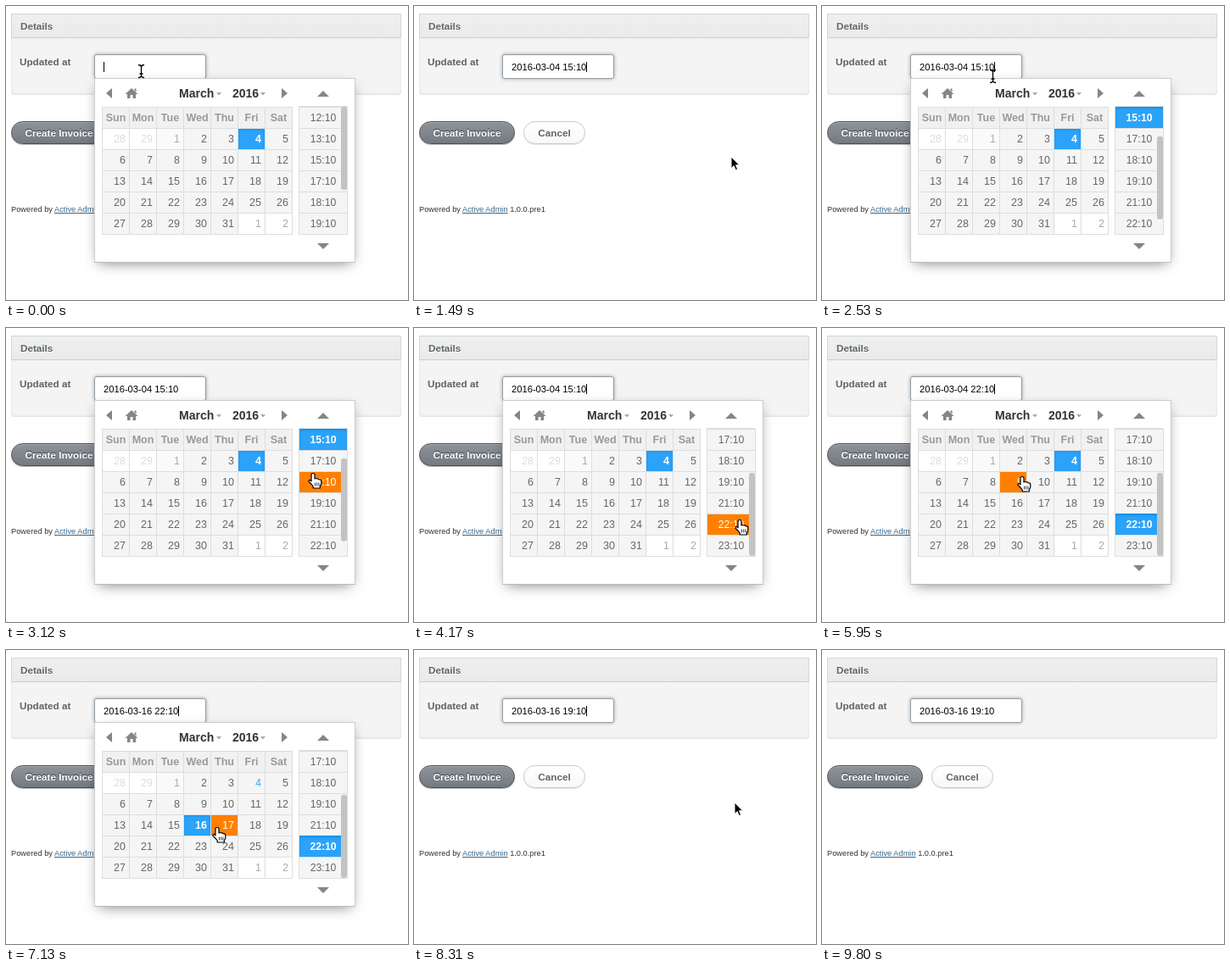
These frames come from a looping animation (474x347 px, 9900 ms). An HTML page:

```html
<!DOCTYPE html>
<html lang="en">
<head>
<meta charset="utf-8">
<title>Date and time picker</title>
<style>
  html, body { margin: 0; width: 100%; height: 100%; overflow: hidden; background: #fff; }
  body { position: relative; font: 11.7px/1 "Liberation Sans", Arial, sans-serif; color: #5e6469; }
  div, span, svg { position: absolute; box-sizing: border-box; white-space: pre; }
  svg { overflow: visible; }

  #head { left: 6px; top: 9px; width: 460px; height: 29px; padding-left: 10px; line-height: 28px;
    border: 1px solid #d3d5d7; border-bottom-color: #cbced0; font-weight: bold;
    background: linear-gradient(#efefef, #e9eaea); text-shadow: 0 1px #fff; }
  #panel { left: 6px; top: 38px; width: 460px; height: 67px; border-radius: 0 0 4px 4px;
    background: #f4f4f4; box-shadow: inset 0 -1px 3px #ddd; }
  #label { left: 16px; top: 58px; line-height: 16px; font-weight: bold; }
  #field { left: 104px; top: 57px; width: 132px; height: 29px; border: 1px solid #959da5;
    border-radius: 3px; background: #fff; box-shadow: 0 0 4px #99a2aa; }
  #text { left: 10px; top: 0; font-size: 11.2px; line-height: 28px; color: #000; }
  #caret { top: 66px; width: 1px; height: 12px; background: #000; }

  .button { top: 136px; height: 27px; border-radius: 14px; line-height: 26px; text-align: center; font-weight: bold; }
  #create { left: 6px; width: 113px; border: 1px solid #484e53; color: #fff; text-shadow: 0 -1px 1px #333;
    background: linear-gradient(#8d9399, #737a80); box-shadow: 0 1px 1px #bbb, inset 0 1px #a5aaaf; }
  #cancel { left: 129px; width: 73px; border: 1px solid #c8cacc; background: linear-gradient(#fff, #f8f8f8);
    box-shadow: 0 1px 1px #e4e4e4; }
  #foot { left: 6px; top: 234px; font-size: 9.28px; line-height: 12px; color: #333; }
  #foot u { color: #38678b; }

  #picker { left: 104px; top: 85px; width: 308px; height: 218px; background: #fff;
    border: 1px solid #ccc; border-bottom-color: #bbb; box-shadow: 0 5px 15px -5px rgba(0, 0, 0, .5); }
  #picker > svg { left: -105px; top: -86px; fill: #858585; }
  .title { top: 8px; font-size: 14px; line-height: 18px; font-weight: bold; color: #333; }
  .cell { width: 33px; height: 26px; border: 1px solid #ddd; background: #f5f5f5; color: #666;
    font-size: 12.5px; line-height: 24px; text-align: right; padding-right: 4px; }
  .cell.name { padding: 0; text-align: center; font-weight: bold; color: #999; background: #f1f1f1; }
  .past { background: #fafafa; color: #aaa; }
  .outside { background: #fff; color: #aaa; }
  .past.outside { color: #ddd; }
  .today { color: #3af; }
  #times { left: 240px; top: 32px; width: 58px; height: 152px; border: 1px solid #ddd; overflow: hidden; background: #f5f5f5; }
  #rows { left: 0; top: 0; width: 56px; }
  .row { width: 56px; height: 25px; border-top: 1px solid #ddd; background: #f5f5f5; color: #666;
    font-size: 12.2px; line-height: 24px; text-align: center; }
  #thumb { left: 49px; top: 0; width: 7px; height: 98px; border-radius: 3px; background: #c3c3c3; }
  .on { background: #2ba3fb; color: #fff; font-weight: bold; box-shadow: inset 0 1px 3px #178fe5; }
  .row.on { border-color: #178fe5; }
  .cell.hover, .row.hover { background: #ff8000; color: #fff; box-shadow: none; }

  #pointer { left: 0; top: 0; width: 1px; height: 1px; }
</style>
</head>
<body>
<div id="head">Details</div>
<div id="panel"></div>
<div id="label">Updated at</div>
<div id="field"><span id="text"></span></div>
<div id="caret"></div>
<div id="create" class="button">Create Invoice</div>
<div id="cancel" class="button">Cancel</div>
<div id="foot">Powered by <u>Active Admin</u> 1.0.0.pre1</div>

<div id="picker">
  <svg width="1" height="1">
    <path d="M125 97v12l-7-6zM325 97v12l7-6zM367 107h14l-7-7zM367 280h14l-7 7z"/>
    <path d="M140.500 104l7.500-7 7.500 7h-2.500v5h-3.500v-4h-3v4h-3.500v-5zM151.500 97.500h2v4l-2-2z"/>
    <path d="M248 102h6l-3 3.500zM300 102h6l-3 3.500z" fill="#aaa"/>
  </svg>
  <span class="title" style="left:99px">March</span>
  <span class="title" style="left:162px">2016</span>
  <div id="times"><div id="rows"></div><div id="thumb"></div></div>
</div>

<svg id="pointer">
  <path id="arrow" d="M0 0V13.500L3.200 10.700 5.300 15.600 7.600 14.600 5.500 9.800H9.700Z" fill="#000" stroke="#fff"/>
  <g id="hand" fill="#fff" stroke="#000" stroke-width="1.200" stroke-linejoin="round">
    <path d="M-2 1.500Q-2-.5 0-.5T2 1.500V6Q3.500 5 5 6 6.500 5.600 7.400 7 9.500 6.500 9.800 8.500V11Q9.800 13 8.300 14.500V17H.2V15Q-2 12-4.800 9.500-5.500 7.500-3.600 7.400L-2 8.800Z"/>
    <path d="M2.500 10.500v4M4.700 10.500v4M6.900 10.500v4" stroke-width=".8"/>
  </g>
  <path id="beam" transform="translate(.5)" fill="none" stroke="#000" stroke-width="1.300"
    d="M-3.500-7.500Q-.5-7.500 0-5.500 .5-7.500 3.500-7.500M0-5.500V5.500M-3.500 7.500Q-.5 7.500 0 5.500 .5 7.500 3.500 7.500M-2 3H2"/>
</svg>

<script>
const LOOP = 9900, TICK = 148.4, BLINK = 3;
const $ = id => document.getElementById(id);

// Pointer moves: first tick, last tick, where it arrives.
const moves = [
  [0, 0, 159, 77], [3, 8, 374, 178], [12, 15, 201, 83], [18, 22, 381, 182], [26, 28, 384, 227],
  [31, 36, 223, 81], [39, 41, 240, 209], [47, 48, 249, 210], [49, 51, 368, 226], [52, 52, 378, 180],
  [62, 66, 440, 350]
];
// Each track holds [start tick, value] and keeps its value until the next entry.
const openTrack = [[0, true], [10, false], [17, true], [29, false], [37, true], [56, false]];
const textTrack = [[0, ""], [10, "2016-03-04 15:10"], [29, "2016-03-04 22:10"],
  [43, "2016-03-16 22:10"], [56, "2016-03-16 19:10"]];
const dayTrack = [[0, 4], [44, 16]];
const scrollTrack = [[0, 0], [17, 50], [25, 75]];

const last = (track, tick) => track.findLast(step => step[0] <= tick);
const smooth = p => p * p * (3 - 2 * p);

function pointerAt(tick) {
  const i = moves.findLastIndex(move => move[0] <= tick);
  const [from, to, x, y] = moves[i];
  const [, , x0, y0] = moves[Math.max(i - 1, 0)];
  const p = smooth(Math.min(1, (tick - from + 1) / (to - from + 1)));
  return [x0 + (x - x0) * p, y0 + (y - y0) * p];
}

function add(parent, cls, text, x, y) {
  const el = document.createElement("div");
  el.className = cls;
  el.textContent = text;
  el.style.left = x + "px";
  el.style.top = y + "px";
  parent.append(el);
  return el;
}

"Sun Mon Tue Wed Thu Fri Sat".split(" ").forEach((name, i) => add($("picker"), "cell name", name, 8 + 32 * i, 33));

const days = Array.from({ length: 35 }, (_, i) => {
  const date = new Date(2016, 1, 28 + i);
  const el = add($("picker"), "cell", date.getDate(), 8 + 32 * (i % 7), 58 + 25 * Math.floor(i / 7));
  el.classList.toggle("past", i < 3);
  el.classList.toggle("outside", date.getMonth() !== 2);
  el.classList.toggle("today", i === 5);
  return el;
});

const hours = [12, 13, 15, 17, 18, 19, 21, 22, 23].map((h, i) => add($("rows"), "row", h + ":10", 0, 25 * i));

function mark(list, selected, hovered) {
  list.forEach((el, i) => {
    el.classList.toggle("on", i === selected);
    el.classList.toggle("hover", i === hovered);
  });
}

function draw() {
  const tick = Math.floor((performance.now() % LOOP + 4) / TICK);
  const [x, y] = pointerAt(tick);
  const [, open] = last(openTrack, tick);
  const [typed, text] = last(textTrack, tick);
  const [, date] = last(dayTrack, tick);
  const [, scroll] = last(scrollTrack, tick);

  const inRows = open && y < 269;
  const day = inRows && x >= 113 && x < 337 && y >= 144
    ? 7 * Math.floor((y - 144) / 25) + Math.floor((x - 113) / 32) : -1;
  const hour = inRows && x >= 346 && x < 403 && y >= 119 ? Math.floor((y - 119 + scroll) / 25) : -1;
  mark(days, date + 1, day);
  mark(hours, hours.findIndex(el => el.textContent === text.slice(-5)), hour);

  $("picker").style.display = open ? "" : "none";
  $("rows").style.transform = `translateY(${-scroll}px)`;
  $("thumb").style.transform = `translateY(${scroll * 52 / 75}px)`;
  $("text").textContent = text;

  // The caret blinks from the last edit and stays solid while a day is pointed at.
  const lit = day >= 0 || Math.floor((tick - typed) / BLINK) % 2 === 0;
  $("caret").style.left = (text ? 203 : 115) + "px";
  $("caret").style.opacity = lit ? 1 : 0;

  const overField = x > 104 && x < 236 && y > 57 && y < 86;
  const shape = overField ? "beam" : day >= 0 || hour >= 0 ? "hand" : "arrow";
  for (const id of ["arrow", "hand", "beam"]) $(id).style.display = id === shape ? "" : "none";
  $("pointer").style.transform = `translate(${Math.round(x)}px, ${Math.round(y)}px)`;
  requestAnimationFrame(draw);
}
draw();
</script>
</body>
</html>
```
